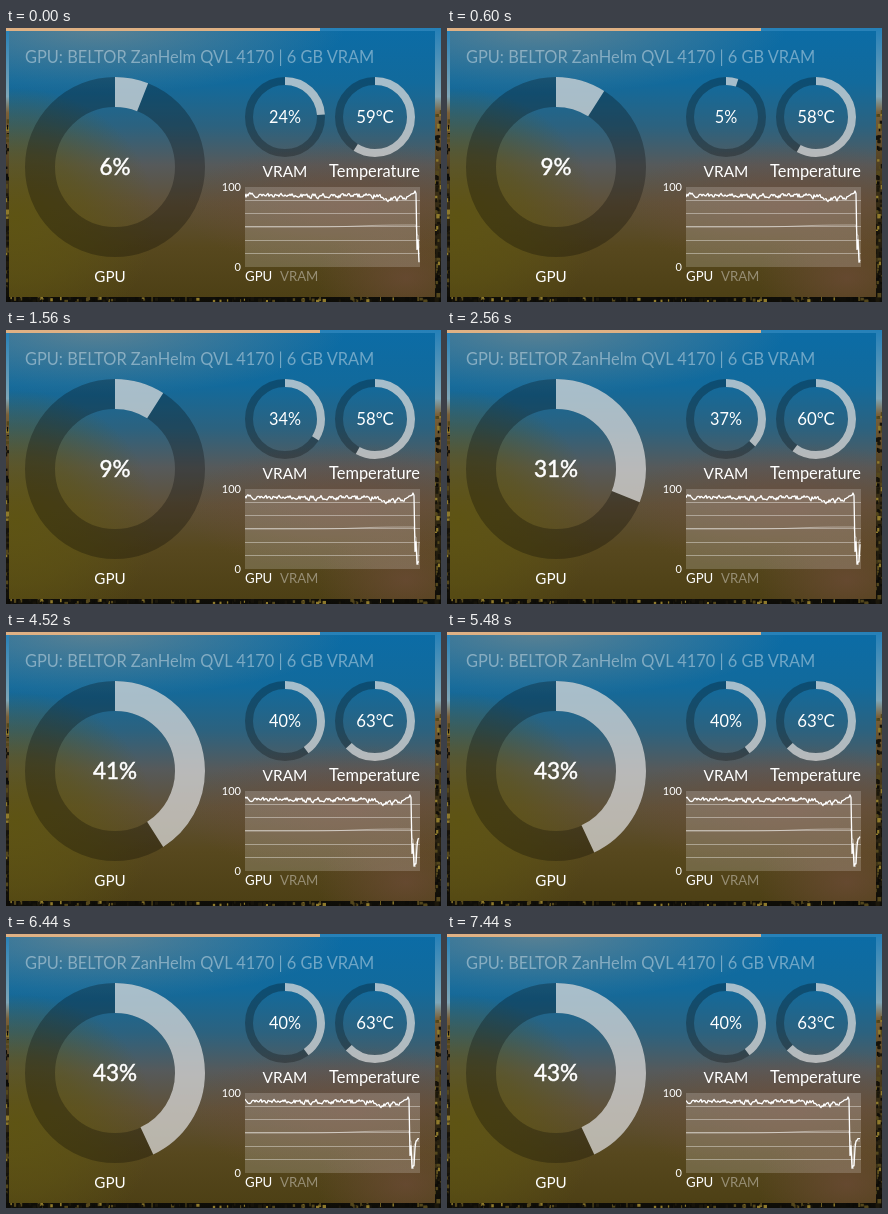
These frames come from a looping animation (435 by 274 pixels, 8000 ms). An HTML page:

```html
<!DOCTYPE html>
<html lang="en">
<head>
<meta charset="utf-8">
<title>GPU monitor</title>
<style>
  html, body { margin: 0; width: 100%; height: 100%; overflow: hidden; background: #14120a; }
  svg { display: block; width: 435px; height: 274px; font-family: Lato, "Open Sans", sans-serif; fill: #fff; }
  .mid { text-anchor: middle; }
  .dim { fill: rgba(255, 255, 255, .4); }
  .track, .arc { fill: none; }
  .track { stroke: rgba(0, 0, 0, .27); }
  .arc { stroke: rgba(255, 255, 255, .63); }
  .plot { fill: none; stroke-linejoin: round; }
</style>
</head>
<body>
<svg viewBox="0 0 435 274">
  <defs>
    <linearGradient id="scene" x2="0" y2="1">
      <stop offset="0" stop-color="#2580b8"/>
      <stop offset=".25" stop-color="#7ea6b8"/>
      <stop offset=".31" stop-color="#7a6038"/>
      <stop offset=".6" stop-color="#3a2f16"/>
      <stop offset="1" stop-color="#0d0c07"/>
    </linearGradient>
    <linearGradient id="glass" x2="0" y2="1">
      <stop offset="0" stop-color="#0b6ca6"/>
      <stop offset=".2" stop-color="#126a9c"/>
      <stop offset=".36" stop-color="#2c627f"/>
      <stop offset=".5" stop-color="#565a5b"/>
      <stop offset=".64" stop-color="#5f5138"/>
      <stop offset=".8" stop-color="#57481e"/>
      <stop offset="1" stop-color="#4c3f14"/>
    </linearGradient>
    <radialGradient id="olive">
      <stop offset="0" stop-color="#5e5412" stop-opacity=".95"/>
      <stop offset=".5" stop-color="#5e5412" stop-opacity=".6"/>
      <stop offset="1" stop-color="#5e5412" stop-opacity="0"/>
    </radialGradient>
    <radialGradient id="rust">
      <stop offset="0" stop-color="#704c3c" stop-opacity=".65"/>
      <stop offset="1" stop-color="#704c3c" stop-opacity="0"/>
    </radialGradient>
    <radialGradient id="haze">
      <stop offset="0" stop-color="#8f8f86" stop-opacity=".6"/>
      <stop offset="1" stop-color="#8f8f86" stop-opacity="0"/>
    </radialGradient>
    <clipPath id="panel"><rect x="3" y="3" width="426" height="266"/></clipPath>
    <clipPath id="chart"><rect x="239" y="159" width="175" height="80"/></clipPath>
  </defs>

  <rect width="435" height="274" fill="url(#scene)"/>
  <g id="speckle"></g>
  <rect width="314" height="3" fill="#dfb184"/>
  <g clip-path="url(#panel)">
    <rect width="435" height="274" fill="url(#glass)"/>
    <ellipse cx="10" cy="190" rx="140" ry="130" fill="url(#olive)"/>
    <ellipse cx="345" cy="178" rx="170" ry="65" fill="url(#rust)"/>
    <ellipse cx="400" cy="250" rx="90" ry="60" fill="url(#rust)"/>
    <ellipse cx="90" cy="0" rx="250" ry="65" fill="url(#haze)"/>
  </g>

  <text class="dim" x="19" y="35" font-size="16.4">GPU: BELTOR ZanHelm QVL 4170 | 6 GB VRAM</text>
  <g id="dials"></g>

  <rect x="239" y="159" width="175" height="80" fill="rgba(255,255,255,.18)"/>
  <path id="grid" stroke="rgba(255,255,255,.38)"/>
  <g clip-path="url(#chart)">
    <path id="memory" class="plot" stroke="rgba(255,255,255,.42)"/>
    <path id="load" class="plot" stroke="#fff" stroke-width="1.3"/>
  </g>
  <g font-size="11">
    <text x="235" y="163" text-anchor="end">100</text>
    <text x="235" y="243" text-anchor="end">0</text>
  </g>
  <g font-size="13.2">
    <text x="239" y="253">GPU</text>
    <text class="dim" x="274" y="253">VRAM</text>
  </g>
  <path id="pointer" d="M384.5 260.5v13l3-3 2 4h3l-2-5h4z" stroke="#000" stroke-width=".8"/>
</svg>
<script>
const LOOP = 8000;
const readings = [
  { at: 0, gpu: 6, vram: 24, temp: 59 },
  { at: 600, gpu: 9, vram: 5, temp: 58 },
  { at: 1560, gpu: 9, vram: 34, temp: 58 },
  { at: 2560, gpu: 31, vram: 37, temp: 60 },
  { at: 3520, gpu: 40, vram: 39, temp: 62 },
  { at: 4520, gpu: 41, vram: 40, temp: 63 },
  { at: 5480, gpu: 43, vram: 40, temp: 63 },
  { at: 6440, gpu: 43, vram: 40, temp: 63 },
  { at: 7440, gpu: 43, vram: 40, temp: 63 }
];
const dials = [
  { key: 'gpu', unit: '%', label: 'GPU', x: 109, y: 139, r: 75, w: 30, size: 22.5, bold: .5, labelX: 104, labelY: 254, labelSize: 15.2 },
  { key: 'vram', unit: '%', label: 'VRAM', x: 279, y: 89, r: 36, w: 8, size: 16.3, bold: 0, labelX: 279, labelY: 149, labelSize: 15.4 },
  { key: 'temp', unit: '°C', label: 'Temperature', x: 369, y: 89, r: 36, w: 8, size: 16.8, bold: 0, labelX: 368.5, labelY: 149, labelSize: 16.4 }
];
const byId = id => document.getElementById(id);

function add(parent, tag, attrs, text = '') {
  const el = document.createElementNS('http://www.w3.org/2000/svg', tag);
  for (const name in attrs) el.setAttribute(name, attrs[name]);
  el.textContent = text;
  return parent.appendChild(el);
}

let seed = 17;
const random = () => (seed = seed * 16807 % 2147483647) / 2147483647;

// Scenery showing around the panel
const tones = ['#0c0b07', '#1b170b', '#8f7a2c', '#54471c', '#15120a'];
for (let i = 0; i < 260; i++) {
  const low = i < 130;
  const left = i % 3 === 0;
  add(byId('speckle'), 'rect', {
    x: low ? random() * 435 : left ? random() * 2 - 1 : 428 + random() * 6,
    y: low ? 268 + random() * 4 : 82 + random() * 185,
    width: 1 + random() * 3,
    height: 2 + random() * 3,
    fill: tones[Math.floor(random() * tones.length)]
  });
}

for (const d of dials) {
  const ring = { cx: d.x, cy: d.y, r: d.r, 'stroke-width': d.w };
  const group = byId('dials');
  add(group, 'circle', { ...ring, class: 'track' });
  d.arc = add(group, 'circle', {
    ...ring, class: 'arc', pathLength: 100, transform: `rotate(-90 ${d.x} ${d.y})`
  });
  d.value = add(group, 'text', {
    class: 'mid', x: d.x, y: d.y + d.size * .36, 'font-size': d.size, stroke: '#fff', 'stroke-width': d.bold
  });
  add(group, 'text', { class: 'mid', x: d.labelX, y: d.labelY, 'font-size': d.labelSize }, d.label);
}

byId('grid').setAttribute('d', [1, 2, 3, 4, 5]
  .map(i => `M239 ${Math.ceil(159 + i * 80 / 6) - .5}h175`).join(''));

// One sample per pixel: steady high load, then the sudden drop
const HISTORY = 180;
const loads = [];
const memories = [];
let jitter = 0;
for (let age = HISTORY; age > 4; age--) {
  jitter = jitter * .4 + (random() - .5) * 5.5;
  const dip = 4.5 * Math.exp(-(((age - 26) / 11) ** 2));
  const rise = age < 12 ? (12 - age) * .7 : 0;
  loads.push(89 + jitter * (age < 12 ? .5 : 1) - dip + rise);
}
loads.push(95, 92, 22, 34);
for (let age = HISTORY; age > 0; age--) {
  memories.push(age < 3 ? 40 : 50 + 2.5 / (1 + Math.exp((age - 60) / 12)));
}
loads.push(...readings.map(r => r.gpu));
memories.push(...readings.map(r => r.vram));

function plot(id, samples, step) {
  const last = HISTORY + step;
  const points = samples.slice(last - 174, last + 1)
    .map((v, i) => `${239 + i} ${(239 - v * .8).toFixed(2)}`);
  byId(id).setAttribute('d', 'M' + points.join('L'));
}

let shown = -1;
function show(step) {
  for (const d of dials) {
    const value = readings[step][d.key];
    d.arc.setAttribute('stroke-dasharray', `${value} 100`);
    d.value.textContent = value + d.unit;
  }
  plot('load', loads, step);
  plot('memory', memories, step);
  shown = step;
}

const start = performance.now();
function frame() {
  const t = (performance.now() - start) % LOOP;
  const step = readings.filter(r => r.at <= t).length - 1;
  if (step !== shown) show(step);
  byId('pointer').style.visibility = t >= 120 && t < 160 ? 'visible' : 'hidden';
  requestAnimationFrame(frame);
}
frame();
</script>
</body>
</html>
```
